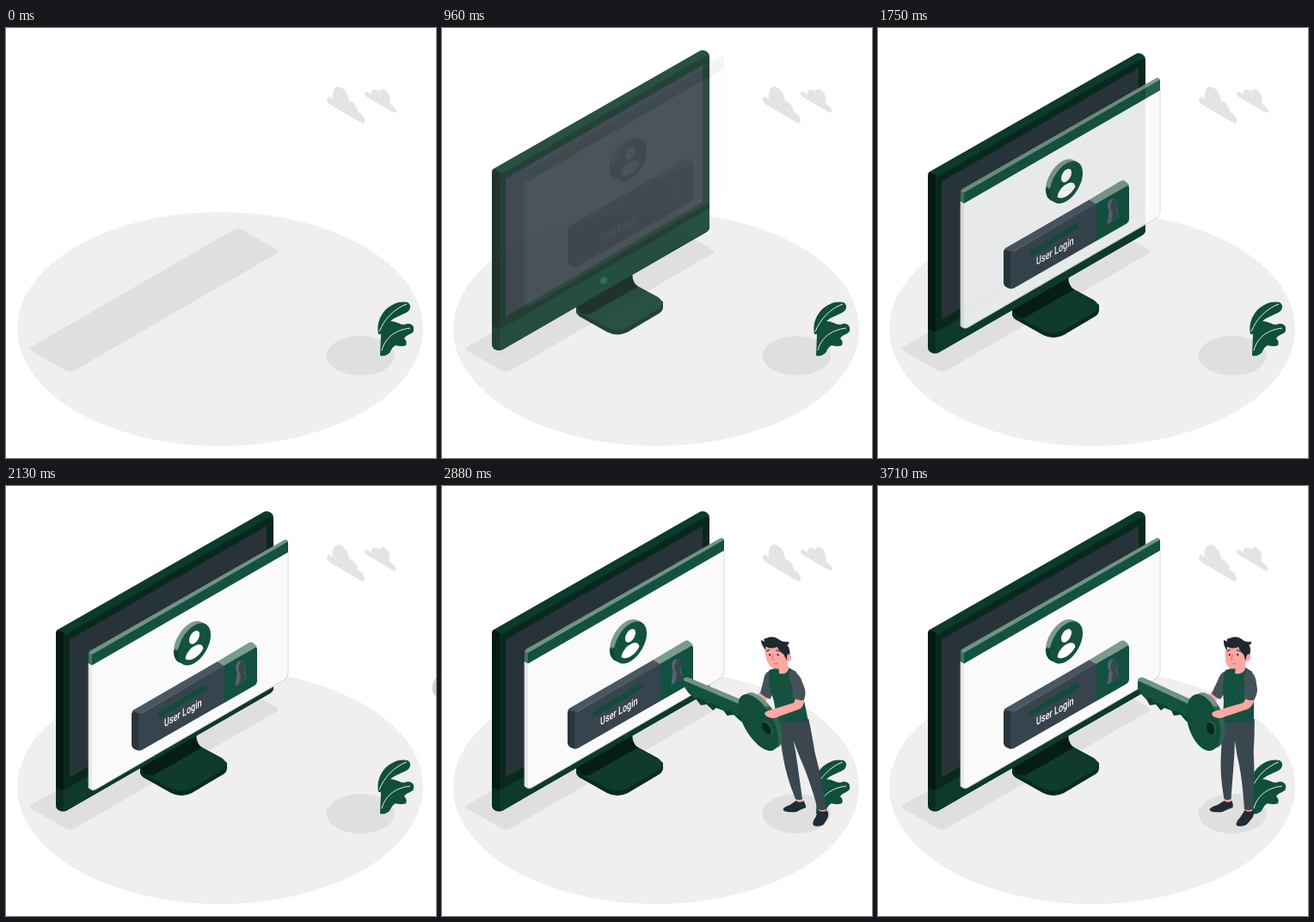
An HTML page that plays this animation: 500x500 px, repeating every 3.75 s.

```html
<!DOCTYPE html>
<html lang="en">
<head>
<meta charset="utf-8">
<title>User login</title>
<style>
  html, body { margin: 0; width: 100%; height: 100%; overflow: hidden; background: #fff; }
  svg { display: block; width: 100vw; height: 100vh; }
  text { font: 500 13px Roboto, Arial, sans-serif; }
</style>
</head>
<body>
<svg viewBox="0 0 500 500">
  <defs>
    <linearGradient id="rim" x1="0" y1="0" x2=".35" y2="1">
      <stop offset=".42" stop-color="#7b9b8f"/>
      <stop offset=".42" stop-color="#0e4434"/>
    </linearGradient>
    <linearGradient id="bow" x1="0" y1="0" x2="0" y2="1">
      <stop offset=".28" stop-color="#6f9485"/>
      <stop offset=".34" stop-color="#2b614f"/>
    </linearGradient>
  </defs>

  <ellipse cx="249" cy="350" rx="236" ry="136" fill="#efefef"/>
  <g fill="#dfdfdf">
    <path d="M264 235Q269 232 274 234L315 258Q318 260 315 262L80 398Q74 401 69 398L29 375Q26 373 29 371Z"/>
    <ellipse cx="412.3" cy="381" rx="39.6" ry="23"/>
  </g>
  <g fill="#e4e4e4">
    <path d="M373 83C373 79 377 79 380 83C379 75 381 68 387 68C394 70 398 77 399 85C403 85 409 91 409 98C414 99 417 104 417 109C416 111 414 111 411 109L377 89C374 87 373 85 373 83Z"/>
    <path d="M417 76C417 73 420 73 425 78C424 73 427 71 430 72Q433 72 434 74C436 70 439 70 442 73C446 77 447 82 446 88C450 90 453 93 454 97C454 99 452 98 450 98L421 81C418 79 417 78 417 76Z"/>
  </g>

  <g id="plant">
    <path fill="#0f4f3c" d="M433 356C431 345 434 336 441 328C449 320 459 317 467 319C471 321 471 327 467 330C460 334 452 336 447 341C456 341 459 347 466 344C472 343 475 347 474 352C473 356 466 356 463 361Q467 364 465 369Q460 371 453 369Q449 371 447 376C445 380 440 382 435 381L436 356Z"/>
    <path fill="none" stroke="#fff" stroke-width=".9" d="M434 353C440 338 452 326 466 321M437 375C440 362 451 351 470 349"/>
  </g>

  <g id="monitor">
    <path fill="#092a20" d="M156 327V334Q157 337 160 339L192 357Q204 363 216 357L253 335Q257 332 257 328V322L250 316L228 304Z"/>
    <path fill="#0e3b2d" d="M156 327Q157 332 161 335L193 352Q204 357 215 352L252 330Q260 324 252 317L228 304Q221 300 221 288Z"/>
    <path fill="#061d15" d="M156 326L221 288Q221 300 228 304L172 336Q165 338 160 334Z"/>
    <path fill="#0c3a2c" d="M58 173Q58 168 62 166L300 30Q304 28 308 31Q311 33 311 37V234Q311 239 307 241L71 377Q66 380 62 377Q58 375 58 370Z"/>
    <path fill="#051a12" d="M58 173Q58 168 60 167L69 172Q67 174 67 178V354L58 350Z"/>
    <path fill="#0a2c21" d="M58 350L67 354V378Q58 379 58 370Z"/>
    <path fill="#08281d" d="M67 180Q67 175 71 172L303 38Q311 34 311 41V234Q311 239 307 241L71 377Q67 379 67 374Z"/>
    <path fill="#0d3a2c" d="M67 354L311 213V234Q311 239 307 241L71 377Q67 379 67 374Z"/>
    <path fill="#283239" d="M74 178.500L303 46.500V206L74 339Z"/>
    <circle cx="188" cy="297" r="4" fill="#1a5e45"/>
  </g>

  <g id="window">
    <path fill="#e9e9e9" stroke="#cfcfcf" stroke-width=".8" d="M96 204L100 206L328 74V215Q328 221 323 224L104 351Q100 353 96 349Z"/>
    <path fill="#fafafa" d="M100 206L327.500 74V215Q327.500 220 323 223L104 350Q100 352 100 348Z"/>
    <path fill="#6f9485" d="M96 192Q97 190 99 189L323 61Q327 59 328 63V66L100 197L96 204Z"/>
    <path fill="#14523f" d="M100 194L328 62.500V75L100 206.500Z"/>
    <path fill="#3f7562" d="M96 192L100 194V206.500L96 204Z"/>

    <g fill="url(#rim)">
      <circle r="22" transform="matrix(.866 -.5 0 1 214 179.500)"/>
      <circle r="22" transform="matrix(.866 -.5 0 1 216.500 180.500)"/>
    </g>
    <g transform="matrix(.866 -.5 0 1 219 182)">
      <circle r="22" fill="#14523f"/>
      <g fill="#fff">
        <circle cy="-8" r="7"/>
        <path d="M-12 11C-11 -1 11 -1 12 11C6 18 -6 18 -12 11Z"/>
      </g>
    </g>

    <path fill="#2a343b" d="M146 263Q146 260 149 258L157 262L155 306Q146 304 146 299Z"/>
    <path fill="#485762" d="M147 260L149 258L246 202L254 207L156 263Z"/>
    <path fill="#7b9b8f" d="M246 202L281 181Q285 178 288 181L292 185L254 207Z"/>
    <path fill="#37444d" d="M154 267Q154 264 157 262.500L254 206.500V250L158 305Q154 307 154 302Z"/>
    <path fill="#125040" d="M254 206.500L288 187Q292 184 292 188V225Q292 228 289 230L254 250Z"/>
    <path fill="none" stroke="#124c3b" stroke-width="6.500" stroke-linecap="round" d="M179 264L230.500 233"/>
    <text transform="matrix(.7 -.4 0 1 184 278.500)" fill="#fff">User Login</text>
    <g fill="#56656d">
      <ellipse cx="273" cy="209" rx="6" ry="8"/>
      <path d="M269 212L277 208L280 223L266.500 231Z"/>
    </g>
    <path fill="#37474f" d="M273 202Q279 200 279 208Q278 213 277 215L280 223L271 228L273 218Q268 211 273 202Z"/>
  </g>

  <g id="man">
    <path fill="#fea7a4" d="M403 361H411.500V370H403ZM427 372H436V380H427ZM351 250Q354 245 361 247L369 251L362 257Z"/>
    <g fill="#1f2c35">
      <path d="M386 376Q388 373 395 371L403 366Q408 369 412 366Q414 371 413 374Q406 376 401 379Q392 380 387 378Z"/>
      <path d="M417 393Q418 389 422 385L427 377Q432 380 437 377Q439 382 435 387Q432 391 429 394Q422 397 418 395Z"/>
    </g>
    <path fill="#3a474f" d="M401 271H438Q438 292 437 310Q439 345 436.500 376Q431 378 426.500 376Q424 338 418 314L415 296Q415 310 414 322L411 364Q407 366 403 364Q398 338 399 315Z"/>

    <path fill="#fea7a4" d="M388 239L397 245L389 254L378 251Z"/>
    <path fill="#44525a" d="M404 215Q398 217 395 226L388 241Q392 246 398 248L405 238Z"/>
    <path fill="#14523f" d="M404 214L415 211H427L435 216Q438 240 437 273Q420 277 401 274L402 250Q399 230 404 214Z"/>
    <path fill="#fea7a4" d="M416 206L427 203V213Q423 220 415 218Z"/>
    <path fill="#fea7a4" d="M404 189Q402 203 406 209Q409 214 418 212Q426 210 428 204Q434 203 433 197Q431 193 427 197L424 185Z"/>
    <path fill="#1d2830" d="M405 191L403 187Q401 183 402 179L406 181Q404 177 409 177Q417 173 425 180Q430 182 434 181Q434 184 431 185Q434 188 432 196Q429 194 428 199L427 203L425 196Q420 192 419 187Q412 190 406 187Z"/>
    <g fill="none" stroke="#1d2830" stroke-width="1.100" stroke-linecap="round">
      <path d="M406 192L409 190.500M417 191L421 192"/>
      <path stroke-width="2" d="M408.500 196V196.500M418 196V196.500"/>
      <path stroke="#e2736f" d="M412 196L410.500 202H412M411 207Q414 207 416 206"/>
    </g>

    <path fill="#0d4031" d="M302 227L366 257V274Q361 276 358 273L352 266L344 267L341 261L333 258L329 261L323 254L316 255L312 248L305 241L302 235Z"/>
    <path fill="#14523f" d="M302 226L368 253L364 270L355 267L348 261L342 262L330 252L324 253L317 246L310 246L303 236Z"/>
    <path fill="#6f9485" d="M302 226Q302 222 308 222.500L368 250L364 255Z"/>
    <ellipse fill="url(#bow)" transform="translate(384 272.500) rotate(-17)" rx="18" ry="33.500"/>
    <ellipse fill="#124c3b" transform="translate(378.500 275) rotate(-17)" rx="18" ry="34"/>
    <ellipse fill="#2b614f" transform="translate(387.500 281.500) rotate(-17)" rx="5.500" ry="8.500"/>
    <ellipse fill="#08281d" transform="translate(386.700 282) rotate(-17)" rx="4.500" ry="7.500"/>

    <path fill="#fea7a4" d="M428 246L438 247Q437 254 431 259L404 268Q397 272 390 268Q386 264 391 262L401 259L425 252Z"/>
    <path fill="#44525a" d="M428 214Q436 215 439 224L441 236Q441 243 437 249Q430 250 425 246Q428 232 425 224Z"/>
  </g>
</svg>

<script>
  const LOOP = 3750, STEP = 1000 / 24;
  const SLIDE = 1650, ENTER = 2083;
  const WINDOW_START = 750, MAN_START = 1803;
  const [monitor, loginWindow, man] = ['monitor', 'window', 'man'].map(id => document.getElementById(id));

  const bezier = (a, b, s) => 3 * a * s * (1 - s) ** 2 + 3 * b * s * s * (1 - s) + s ** 3;
  const lerp = (a, b, p) => a + (b - a) * p;
  const tan = degrees => Math.tan(degrees * Math.PI / 180);

  // cubic-bezier(.36, -.01, .5, 1.38)
  function ease(x) {
    if (x <= 0) return 0;
    if (x >= 1) return 1;
    let low = 0, high = 1;
    for (let i = 0; i < 24; i++) {
      const mid = (low + high) / 2;
      if (bezier(.36, .5, mid) < x) low = mid; else high = mid;
    }
    return bezier(-.01, 1.38, low);
  }

  function place(node, opacity, transform) {
    node.style.opacity = Math.max(0, Math.min(1, opacity));
    node.setAttribute('transform', transform);
  }

  function slideDown(node, time) {
    const p = ease(time / SLIDE);
    place(node, p, `translate(0 ${-30 * (1 - p)})`);
  }

  // Enter from the right, lean one way, lean back, settle
  function lightSpeed(node, time) {
    const x = time / ENTER;
    const p = ease(x / .6);
    let skew;
    if (x < .6) skew = lerp(tan(-20), tan(10), p);
    else if (x < .8) skew = lerp(tan(10), tan(-2), ease((x - .6) / .2));
    else skew = lerp(tan(-2), 0, ease((x - .8) / .2));
    place(node, p, `matrix(1 0 ${skew} 1 ${250 * (1 - p) - 250 * skew} 0)`);
  }

  function draw(now) {
    const time = Math.floor((now % LOOP + 4) / STEP) * STEP;
    slideDown(monitor, time < 208 ? 0 : time);
    slideDown(loginWindow, time - WINDOW_START);
    lightSpeed(man, time - MAN_START);
  }

  const start = performance.now();
  function tick() {
    draw(performance.now() - start);
    requestAnimationFrame(tick);
  }
  tick();
</script>
</body>
</html>
```
